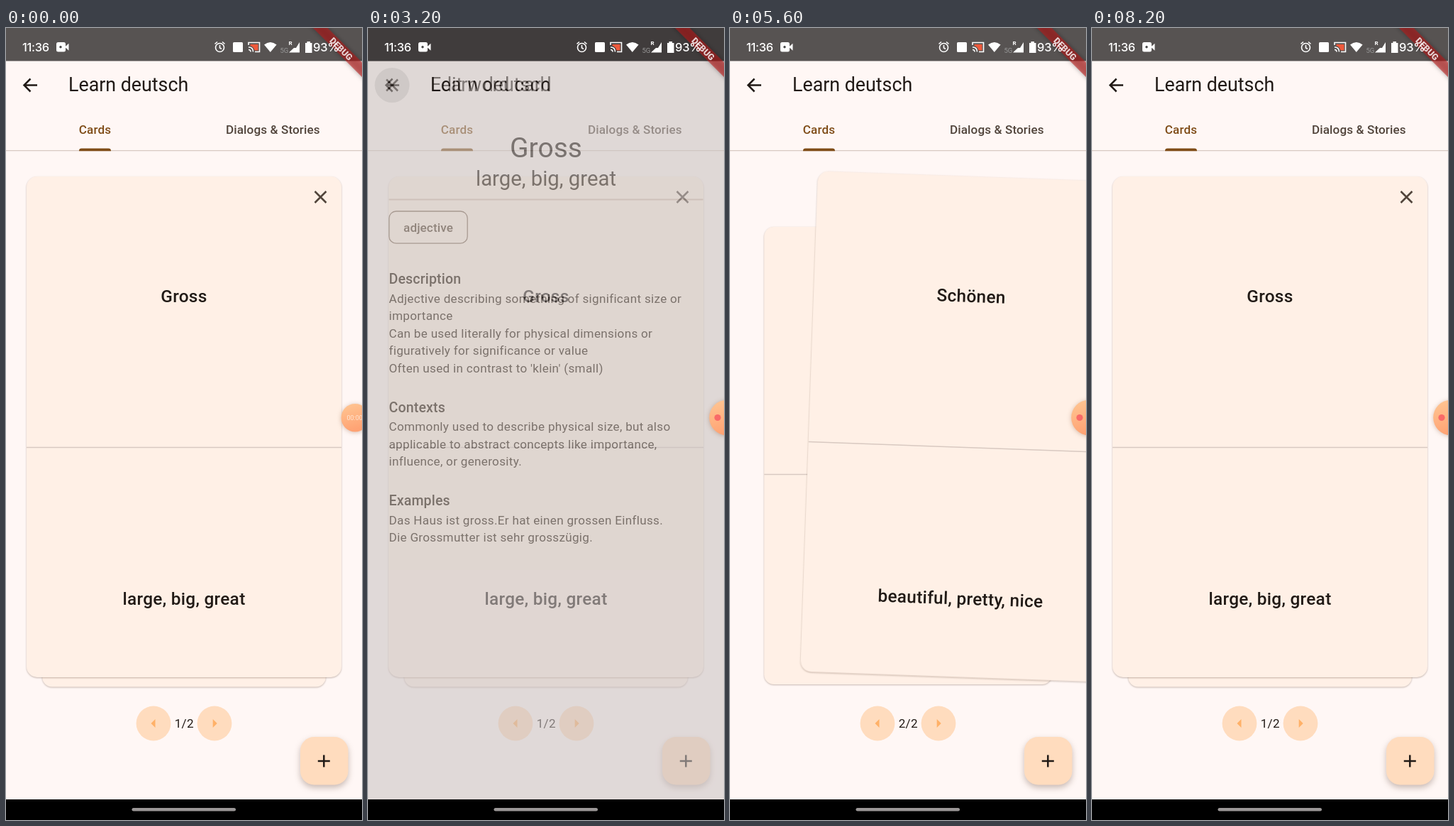
An HTML page for the animation above (8.7 s loop, 502 px wide and 1115 px high).

```html
<!DOCTYPE html>
<html lang="en">
<head>
<meta charset="utf-8">
<title>Word cards</title>
<style>
  html, body { margin: 0; width: 100%; height: 100%; overflow: hidden; background: #fff7f5; }
  svg { display: block; width: 100%; height: 100%; }
  text { font-family: Roboto, sans-serif; fill: #211a16; white-space: pre; }
  .mid { text-anchor: middle; }
  .title { font-size: 26.8px; }
  .label { font-size: 17.1px; font-weight: 500; letter-spacing: .12px; fill: #51443b; }
  .word { font-size: 24.4px; font-weight: 500; letter-spacing: .3px; }
  .head { font-size: 19.5px; font-weight: 500; letter-spacing: .18px; }
  .body { font-size: 17.1px; letter-spacing: .305px; }
  .status { font: 500 16.5px Inter, sans-serif; fill: #fff; }
  .stroke { fill: none; stroke: #211a16; stroke-width: 2.5; }
  .card rect { fill: #fff0e6; filter: drop-shadow(0 1px 1px rgba(60, 30, 10, .3)); }
  .peach { fill: #ffdcbe; }
  .arrow { fill: #ffb168; }
  .fab { filter: drop-shadow(0 4px 4px rgba(60, 30, 10, .28)); }
  .soft { filter: drop-shadow(0 1px 3px rgba(120, 60, 20, .3)); }
</style>
</head>
<body>
<svg id="stage" viewBox="0 0 502 1115" preserveAspectRatio="none"></svg>
<script>
const LOOP = 8700, STEP = 100;
const DP = 1.22;                       // stage pixels per layout unit
const CENTER = { x: 251, y: 561.5 };   // resting place of the front card
const DRAG = 146, FLING_MS = 200, WIDTH = 502;

const swipes = [
  { start: 4370, dir: -1, drag: 300 },
  { start: 5330, dir: 1, drag: 400 },
  { start: 6432, dir: -1, drag: 400 },
  { start: 7530, dir: 1, drag: 400 },
];

const clamp = v => Math.min(1, Math.max(0, v));
const mix = (a, b, p) => a + (b - a) * p;
const label = (cls, x, y, str, extra = '') => `<text class="${cls}" x="${x}" y="${y}" ${extra}>${str}</text>`;
const lines = (y, ...rows) => rows.map((row, i) => label('body', 29.5, y + i * 24.4, row)).join('');
const cross = (x, y, r, color) =>
  `<path class="stroke" style="stroke:${color}" d="M${x - r} ${y - r}l${2 * r} ${2 * r}m0 ${-2 * r}l${-2 * r} ${2 * r}"/>`;

const card = (id, word, meaning) => `
  <g id="${id}" class="card">
    <rect x="-222" y="-352.5" width="444" height="705" rx="15"/>
    <path d="M-222 29H222" stroke="#d8c9c1" stroke-width="1.5"/>
    ${cross(192.5, -323.5, 8, '#51443b')}
    ${label('word mid', 0, -175.7, word)}
    ${label('word mid', 0, 250.3, meaning)}
  </g>`;

const home = `
  <g id="home">
    <rect width="502" height="1086" fill="#fff7f5"/>
    <path class="stroke" d="M44 80.5H26M34.5 71.5l-9 9l9 9"/>
    ${label('title', 88, 89, 'Learn deutsch')}
    ${label('label mid', 125.5, 149, 'Cards', 'style="fill:#7f4c17"')}
    ${label('label mid', 376.3, 149, 'Dialogs &amp; Stories')}
    <path d="M0 172.6H502" stroke="#d8c9c1" stroke-width="1.4"/>
    <path d="M103 173.2v-.4q0-3.4 3.4-3.4h38.2q3.4 0 3.4 3.4v.4z" fill="#7f4c17"/>
    <g id="deck">${card('schoenen', 'Schönen', 'beautiful, pretty, nice')}${card('gross', 'Gross', 'large, big, great')}</g>
    <circle class="peach" cx="208" cy="979" r="24.4"/>
    <circle class="peach" cx="294" cy="979" r="24.4"/>
    <path class="arrow" d="M204.5 979l6-6v12zM297.7 979l-6-6v12z"/>
    ${label('body mid', 251.3, 985, '1/2', 'id="counter"')}
    <rect class="peach fab" x="415" y="998" width="67.5" height="67.5" rx="19.5"/>
    <path class="stroke" d="M448.3 1023.5v17M439.8 1032h17"/>
    <rect id="scrim" width="502" height="1086" opacity="0"/>
  </g>`;

const edit = `
  <g id="edit">
    <rect width="502" height="1086" fill="#fff7f5"/>
    <circle id="ripple" cx="34" cy="80.5" r="24.5" opacity="0"/>
    ${cross(34, 80.5, 8, '#211a16')}
    ${label('title', 88, 89, 'Edit word card')}
    ${label('mid', 251, 182, 'Gross', 'font-size="39"')}
    ${label('mid', 251, 222, 'large, big, great', 'font-size="29.3"')}
    <path d="M29.5 241.5H472.5" stroke="#d9cac2" stroke-width="2"/>
    <rect x="29.8" y="258" width="110.4" height="45.2" rx="9.8" fill="none" stroke="#84746a" stroke-width="1.3"/>
    ${label('label mid', 85, 287, 'adjective')}
    ${label('head', 29.5, 360, 'Description')}
    ${lines(387, 'Adjective describing something of significant size or', 'importance',
      'Can be used literally for physical dimensions or', 'figuratively for significance or value',
      "Often used in contrast to 'klein' (small)")}
    ${label('head', 29.5, 540.5, 'Contexts')}
    ${lines(567.3, 'Commonly used to describe physical size, but also',
      'applicable to abstract concepts like importance,', 'influence, or generosity.')}
    ${label('head', 29.5, 672, 'Examples')}
    ${lines(699, 'Das Haus ist gross.Er hat einen grossen Einfluss.', 'Die Grossmutter ist sehr grosszügig.')}
  </g>`;

const statusBar = `
  <rect width="502" height="46.5" fill="#575352"/>
  <rect id="darkBar" width="502" height="46.5" fill="#252122"/>
  <g transform="translate(502 0) rotate(45)">
    <rect x="-70" y="34.2" width="140" height="14.6" fill="#b71c1c" fill-opacity=".63"
      style="filter:drop-shadow(0 0 3px rgba(0,0,0,.5))"/>
    ${label('mid', 0, 46, 'DEBUG', 'font-size="12.4" font-weight="900" style="fill:#fff" opacity=".8"')}
  </g>
  ${label('status', 23, 33, '11:36', 'textRendering="geometricPrecision" letter-spacing="-.3"')}
  <g fill="#fff">
    <rect x="71" y="20" width="13" height="13.5" rx="2.5"/><path d="M83 26.7l5.5-5v10z"/>
    <circle cx="77" cy="26.7" r="1.7" fill="#444"/>
    <rect x="320" y="20" width="14" height="14" rx="1.5"/>
    <path d="M364 23.5q8.800-7 17.600 0l-8.800 10.500z"/>
    <path d="M414 20v14.500h-15l7-6.500h3z"/>
    <path d="M424.500 19h4.500v2h2.500v14h-9.500v-14h2.500z"/>
  </g>
  <g fill="none" stroke="#fff" stroke-width="1.6">
    <circle cx="301.500" cy="27.500" r="6"/><path d="M301.500 24v4l2.500 1.500M294.500 22.500l3.500-3M308.500 22.500l-3.500-3"/>
    <path d="M342 24v-3.500h15.500v13h-6.500M342 27q6.500 0 6.500 6.500M342 30.500q3 0 3 3"/>
  </g>
  <path d="M344.500 23h11v8.500h-5q-1-5-6-6.500z" fill="#ee5a3c"/>
  ${label('', 386.5, 35, '5G', 'font-size="9.5" style="fill:#999"')}
  ${label('', 398.5, 23.5, 'R', 'font-size="8" font-weight="700" style="fill:#fff"')}
  ${label('status', 433, 33, '93%', 'letter-spacing="-.2"')}`;

const overlay = `
  <rect y="1086" width="502" height="29"/>
  <rect x="177.500" y="1098" width="146.500" height="4.600" rx="2.300" fill="#9b9797"/>
  <g id="timerBubble">
    <circle class="soft" cx="492.300" cy="548.700" r="19.700" fill="url(#orange)"/>
    ${label('', 480.5, 551.700, '00:00', 'id="timer" font-size="9" style="fill:#fff3e8" opacity=".8"')}
  </g>
  <g id="dotBubble">
    <circle class="soft" cx="506" cy="548.500" r="24.800" fill="url(#orange)"/>
    <circle cx="493" cy="548.500" r="4.600" fill="#f96a68"/>
  </g>`;

document.getElementById('stage').innerHTML = `
  <defs><linearGradient id="orange" x2=".3" y2="1">
    <stop stop-color="#ffc794"/><stop offset="1" stop-color="#ffa273"/>
  </linearGradient></defs>${home}${edit}${statusBar}${overlay}`;

const el = id => document.getElementById(id);
const set = (id, name, value) => el(id).setAttribute(name, value);
const show = (id, on) => set(id, 'visibility', on ? 'visible' : 'hidden');

function place(id, dx, dy, scale, angle) {
  set(id, 'transform', `translate(${CENTER.x + dx} ${CENTER.y + dy}) rotate(${angle}) scale(${scale})`);
}

function drawDeck(t) {
  const endOf = s => s.start + s.drag + FLING_MS;
  const done = swipes.filter(s => t >= endOf(s)).length;
  const [front, back] = done % 2 ? ['schoenen', 'gross'] : ['gross', 'schoenen'];
  const swipe = swipes[done];

  let dir = 0, dragged = 0, fling = 0;
  if (swipe && t > swipe.start) {
    dir = swipe.dir;
    dragged = DRAG * clamp((t - swipe.start) / swipe.drag) ** 1.45;
    fling = clamp((t - swipe.start - swipe.drag) / FLING_MS);
  }
  const units = dragged / DP;
  // The tilt follows the finger only; the card behind grows as the front one leaves.
  place(front, dir * mix(dragged, WIDTH, fling), 0, 1, dir * units * .03);
  place(back, 0, mix((40 - units / 10) * DP, 0, fling), mix(.9 + units / 5000, 1, fling), 0);
  if (el('deck').lastElementChild.id !== front) el('deck').append(el(front));
  el('counter').textContent = `${done % 2 + 1}/2`;
}

function drawEditPage(t) {
  const opening = clamp((t - 970) / 330);
  const opacity = t < 3000 ? clamp((opening - .05) / .3) : 1 - clamp((t - 3090) / 200);
  const scale = 1 - .12 * (1 - opening) ** 3;
  set('edit', 'transform', `translate(251 557) scale(${scale}) translate(-251 -557)`);
  set('edit', 'opacity', opacity);
  set('darkBar', 'opacity', opacity);
  set('scrim', 'opacity', opacity * .5);
  set('ripple', 'opacity', t < 3000 ? 0 : t < 3100 ? .08 : .14);
  show('edit', opacity > 0);
}

function draw(t) {
  drawDeck(t);
  drawEditPage(t);
  const recording = t < 3000;
  show('timerBubble', recording);
  show('dotBubble', !recording);
  el('timer').textContent = t < 1000 ? '00:00' : t < 2200 ? '00:04' : '00:05';
}

function tick() {
  const t = performance.now() % LOOP;
  draw(Math.floor(t / STEP) * STEP);
  requestAnimationFrame(tick);
}
tick();
</script>
</body>
</html>
```
